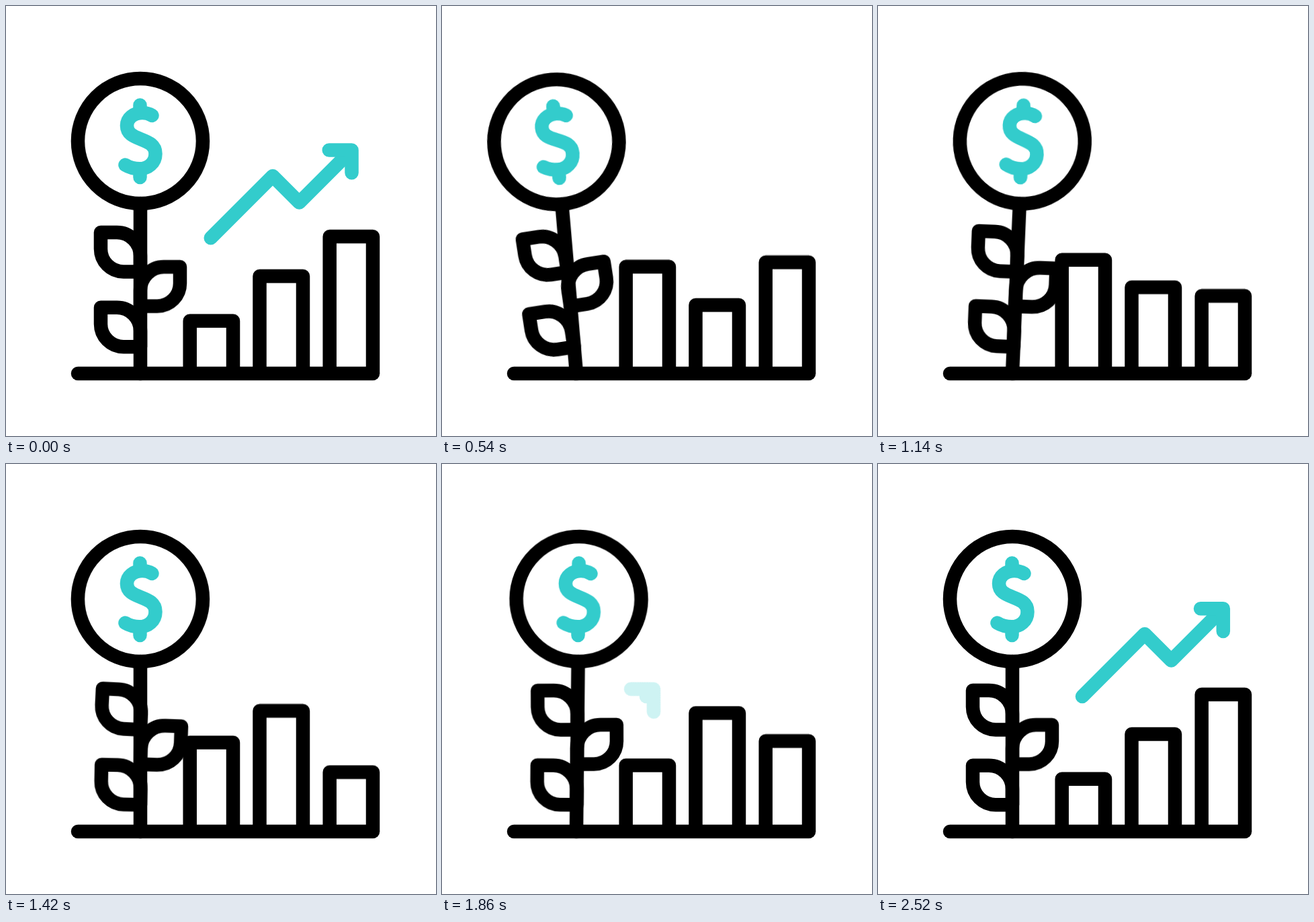
Write an HTML page that moves like this. It is 640x640 px and loops after 2.62 s.

```html
<!DOCTYPE html>
<html lang="en">
<head>
<meta charset="utf-8">
<title>Growth</title>
<style>
  html, body { margin: 0; width: 100%; height: 100%; overflow: hidden; background: #fff; }
  svg { display: block; width: 100%; height: 100%; }
  path, circle { fill: none; stroke: #000; stroke-width: 20.5; stroke-linecap: round; stroke-linejoin: round; }
  .teal path { stroke: #3cc; }

  .plant, .leaf, .bar, .arrow, .shaft, .head { animation: 2620ms linear infinite; }

  .plant { transform-origin: 200px 547px; animation-name: sway; }
  .leaf1 { transform-origin: 200px 395.5px; animation-name: leaf1; }
  .leaf2 { transform-origin: 200px 447px; animation-name: leaf2; }
  .leaf3 { transform-origin: 200px 507px; animation-name: leaf3; }

  @keyframes sway {
    0%, 96.18%, 100% { transform: rotate(0deg); }
    21.37% { transform: rotate(-5.07deg); }
    33.59% { transform: rotate(-.92deg); }
    45.76% { transform: rotate(3.2deg); }
    54.2% { transform: rotate(0deg); }
    62.21% { transform: rotate(-3.1deg); }
    70.99% { transform: rotate(.58deg); }
    73.7% { transform: rotate(1.7deg); }
    83.59% { transform: rotate(-1.08deg); }
  }
  @keyframes leaf1 {
    0%, 96.18%, 100% { transform: rotate(0deg); }
    26.72% { transform: rotate(-5deg); }
    33.59% { transform: rotate(-3deg); }
    54.2% { transform: rotate(2.8deg); }
    70.99% { transform: rotate(-.9deg); }
    83.97% { transform: rotate(.9deg); }
  }
  @keyframes leaf2 {
    0%, 96.18%, 100% { transform: rotate(0deg); }
    24.8% { transform: rotate(-4.7deg); }
    33.59% { transform: rotate(-2.5deg); }
    54.2% { transform: rotate(2deg); }
    70.99% { transform: rotate(-.8deg); }
    83.97% { transform: rotate(.2deg); }
  }
  @keyframes leaf3 {
    0%, 96.18%, 100% { transform: rotate(0deg); }
    22.9% { transform: rotate(-4.3deg); }
    33.59% { transform: rotate(-1.5deg); }
    54.2% { transform: rotate(1.2deg); }
    70.99% { transform: rotate(-.2deg); }
    83.97% { transform: rotate(-.3deg); }
  }

  .bar { animation-name: bar; }
  .bar1 { --a: -128px; --b: -37.5px; }
  .bar2 { --a: 68.3px; --b: -58px; }
  .bar3 { --a: 61px; --b: 128px; }
  @keyframes bar {
    0%, 85.11%, 100% { transform: translateY(0); }
    32.75% { transform: translateY(var(--a)); }
    59.12% { transform: translateY(var(--b)); }
  }

  .arrow { animation-name: fade; }
  .shaft { animation-name: draw; }
  .head {
    offset-path: path("M304 346L397 253L436.5 292.5L505 224L900 -171");
    offset-rotate: auto;
    animation-name: travel;
  }
  @keyframes fade {
    0%, 20%, 73%, 100% { opacity: 1; }
    20.01%, 70.4% { opacity: 0; }
  }
  @keyframes draw {
    0% { stroke-dasharray: 284.3px 2000px; stroke-dashoffset: 0px; }
    20% { stroke-dasharray: 284.3px 2000px; stroke-dashoffset: -540px; }
    20.02%, 70.8% { stroke-dasharray: .1px 2000px; stroke-dashoffset: 0px; }
    91.83%, 100% { stroke-dasharray: 284.3px 2000px; stroke-dashoffset: 0px; }
  }
  @keyframes travel {
    0% { offset-distance: 284.3px; }
    20% { offset-distance: 824.3px; }
    20.02%, 70.8% { offset-distance: 0px; }
    91.83%, 100% { offset-distance: 284.3px; }
  }
</style>
</head>
<body>
<svg viewBox="0 0 640 640">
  <defs>
    <path id="leaf" d="M200 395.5H175A34 34 0 0 1 141 361.5V337H165A35 35 0 0 1 200 372Z"/>
    <clipPath id="ground"><path d="M0 0H640V547H0Z"/></clipPath>
  </defs>

  <g clip-path="url(#ground)">
    <path class="bar bar1" d="M273.7 720V468.7H338V720"/>
    <path class="bar bar2" d="M377.5 720V402H442V720"/>
    <path class="bar bar3" d="M481.7 720V343H546V720"/>
  </g>

  <g class="plant">
    <path d="M200 294V547"/>
    <circle cx="200" cy="201" r="93"/>
    <g class="leaf leaf1"><use href="#leaf"/></g>
    <g class="leaf leaf2"><use href="#leaf" transform="translate(400 51.3) scale(-1 1)"/></g>
    <g class="leaf leaf3"><use href="#leaf" transform="translate(0 111.7)"/></g>
    <g class="teal">
      <path d="M199.5 147.5V158M199.5 243V255"/>
      <path d="M217.5 163Q211 159 203 159C190 159 180 167 180 178C180 190 190 194 200 198C213 203 222.5 207 222.5 220C222.5 234 211 242.3 199 242.3Q187 242.3 177.5 236.5"/>
    </g>
  </g>

  <path d="M107 547H546"/>

  <g class="teal arrow">
    <path class="shaft" d="M304 346L397 253L436.5 292.5L505 224L900 -171"/>
    <path class="head" d="M-11.5 -23.9L12.4 0L-11.5 23.9"/>
  </g>
</svg>
</body>
</html>
```
